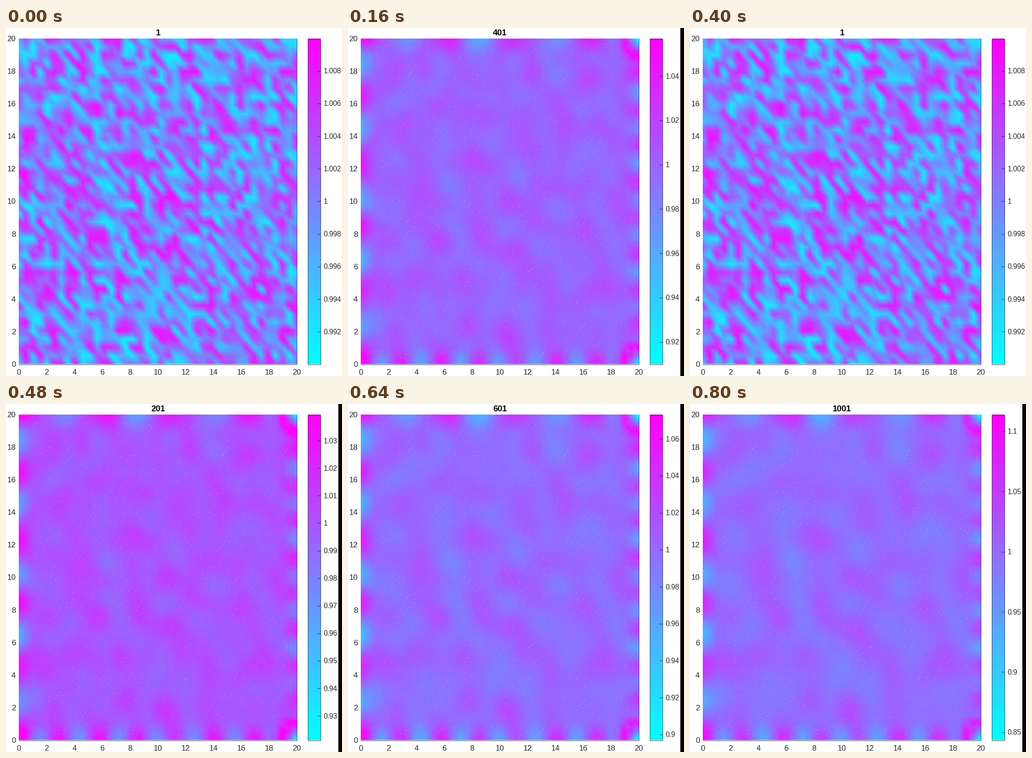
Recreate the animation shown at these times as a matplotlib script. Size 737x760 px, loop 0.88 s.

```python
import numpy as np
import matplotlib.pyplot as plt
from matplotlib.animation import ArtistAnimation
from matplotlib.patches import Rectangle

W, H = 737, 760
LEFT, RIGHT, TOP, BOTTOM = 28, 638, 23, 734
BAR_L, BAR_R = 662, 690
INK = "#262626"
N, SIZE = 40, 20.0

# step -> lowest and highest value of the colour bar
LIMITS = {1: (.99001, 1.00999), 201: (.9212, 1.0395), 401: (.91, 1.057),
          601: (.897, 1.0732), 801: (.8744, 1.0916), 1001: (.8435, 1.114)}
STEPS = list(LIMITS)
ORDER = STEPS[:5] + STEPS

rng = np.random.RandomState(12)
axis = np.linspace(0, SIZE, N)
X, Y = np.meshgrid(axis, axis)
noise = rng.uniform(-.9, .9, (N, N))


def smooth(a, passes):
    for _ in range(passes):
        p = np.pad(a, 1, mode="edge")
        a = (p[:-2] + 2 * p[1:-1] + p[2:]) / 4
        a = (a[:, :-2] + 2 * a[:, 1:-1] + a[:, 2:]) / 4
    return a


def wall(depth, along, peak, period):
    """Alternating spots along one side, fading into the interior."""
    return np.cos(2 * np.pi * (along - peak) / period) * np.exp(-(depth / .7) ** 2)


def corner(y):
    """A dip in a right-hand corner with a raised arc around it."""
    r = np.hypot(X - SIZE, Y - y)
    return 1.3 * np.exp(-((r - 1) / .45) ** 2) - 2 * np.exp(-(r / .5) ** 2)


walls = (.9 * wall(X, Y, 8.4, 4) + .55 * wall(SIZE - X, Y, 13.4, 2.2)
         + .75 * wall(Y, X, 8.5, 2.8) + .7 * wall(SIZE - Y, X, 5.8, 5.3))
for y in (0, SIZE):
    near = np.exp(-(np.hypot(X - SIZE, Y - y) / 1.6) ** 4)
    walls = walls * (1 - near) + corner(y)


def field(step):
    """Fine noise at first; it diffuses into slowly growing spots."""
    if step == 1:
        return 1 + .01 * noise
    k = STEPS.index(step) - 1
    spots = smooth(noise, 2 + k // 2) - smooth(noise, 14)
    spots /= spots.std()
    return 1 + .0045 * 1.25 ** k * spots + .04 * 1.2 ** k * walls


def interpolate(v):
    """Linear over triangles split from top left to bottom right."""
    w, h = RIGHT - LEFT, BOTTOM - TOP
    px = (np.arange(w) + .5) / w * (N - 1)
    py = (1 - (np.arange(h) + .5) / h) * (N - 1)
    i, j = px.astype(int)[None, :], py.astype(int)[:, None]
    fx, fy = px[None, :] - i, py[:, None] - j
    a, b, c, d = v[j, i], v[j, i + 1], v[j + 1, i], v[j + 1, i + 1]
    low = a + fx * (b - a) + fy * (c - a)
    high = d + (1 - fx) * (c - d) + (1 - fy) * (b - d)
    return np.where(fx + fy < 1, low, high)


def cool(v):
    v = np.clip(v, 0, 1)
    return np.stack([v, 1 - v, np.ones_like(v)], axis=-1)


def seam_specks():
    """Pale single pixels on steep diagonals, up to two per mesh cell."""
    mask = np.zeros((BOTTOM - TOP, RIGHT - LEFT), bool)
    cw, ch = mask.shape[1] / (N - 1), mask.shape[0] / (N - 1)
    for row in range(1, N - 1):
        for col in range(2, N - 1):
            x = int((col + .7 * rng.rand()) * cw)
            y = int((row + .9 * rng.rand()) * ch)
            for n in range(rng.randint(0, 3)):
                mask[y - 7 * n, x + 4 * n] = True
    return mask


fig = plt.figure(figsize=(W / 100, H / 100), dpi=100, facecolor="white")
ax = fig.add_axes([0, 0, 1, 1])
ax.set_xlim(0, W)
ax.set_ylim(H, 0)
ax.set_autoscale_on(False)
ax.axis("off")


def label(x, y, text, px, ha="center", color=INK, weight="normal"):
    return ax.text(x, y, text, fontsize=px * .72, ha=ha, va="baseline",
                   color=color, weight=weight, family="Liberation Sans")


def picture(rgb, x0, x1):
    return ax.imshow(rgb, extent=[x0, x1, BOTTOM, TOP], aspect="auto",
                     interpolation="nearest", zorder=1)


def line(xs, ys):
    return ax.plot(xs, ys, color=INK, lw=.6, zorder=3)[0]


def ticks(lo, hi):
    """Bar ticks at the first round gap that gives fewer than twelve."""
    gap = next(g for g in (.002, .01, .02, .05) if (hi - lo) / g < 12)
    return gap * np.arange(np.ceil(lo / gap), np.floor(hi / gap) + 1)


for value in range(0, 21, 2):
    part = value / SIZE
    label(LEFT + part * (RIGHT - LEFT), 757, str(value), 17)
    label(21.5, BOTTOM + 6 - part * (BOTTOM - TOP), str(value), 17, ha="right")
picture(cool(np.linspace(1, 0, 256)[:, None]), BAR_L, BAR_R)
line([LEFT, RIGHT + .5, RIGHT + .5], [BOTTOM + .5, BOTTOM + .5, TOP])
ax.add_patch(Rectangle((BAR_L + .5, TOP + .5), BAR_R - BAR_L, BOTTOM - TOP,
                       fill=False, ec=INK, lw=.6, zorder=3))
specks = seam_specks()


def scene(step):
    lo, hi = LIMITS[step]
    rgb = cool((interpolate(field(step)) - lo) / (hi - lo))
    parts = []
    if step > 1:
        rgb[specks] = .35 * rgb[specks] + .65
        parts.append(ax.add_patch(Rectangle((729, 0), W - 729, H, fc="black",
                                            lw=0, zorder=5)))
    parts.append(picture(rgb, LEFT, RIGHT))
    parts.append(label(333.5, 16, str(step), 18.4, color="black", weight="bold"))
    for value in ticks(lo, hi):
        y = BOTTOM - (value - lo) / (hi - lo) * (BOTTOM - TOP)
        parts.append(line([BAR_R - 7, BAR_R], [y, y]))
        parts.append(label(696.5, y + 5.5, f"{value:.6g}", 15.5, ha="left"))
    return parts


scenes = {step: scene(step) for step in STEPS}
anim = ArtistAnimation(fig, [scenes[s] for s in ORDER], interval=80,
                       repeat=True, repeat_delay=0, blit=False)
plt.show()
```
